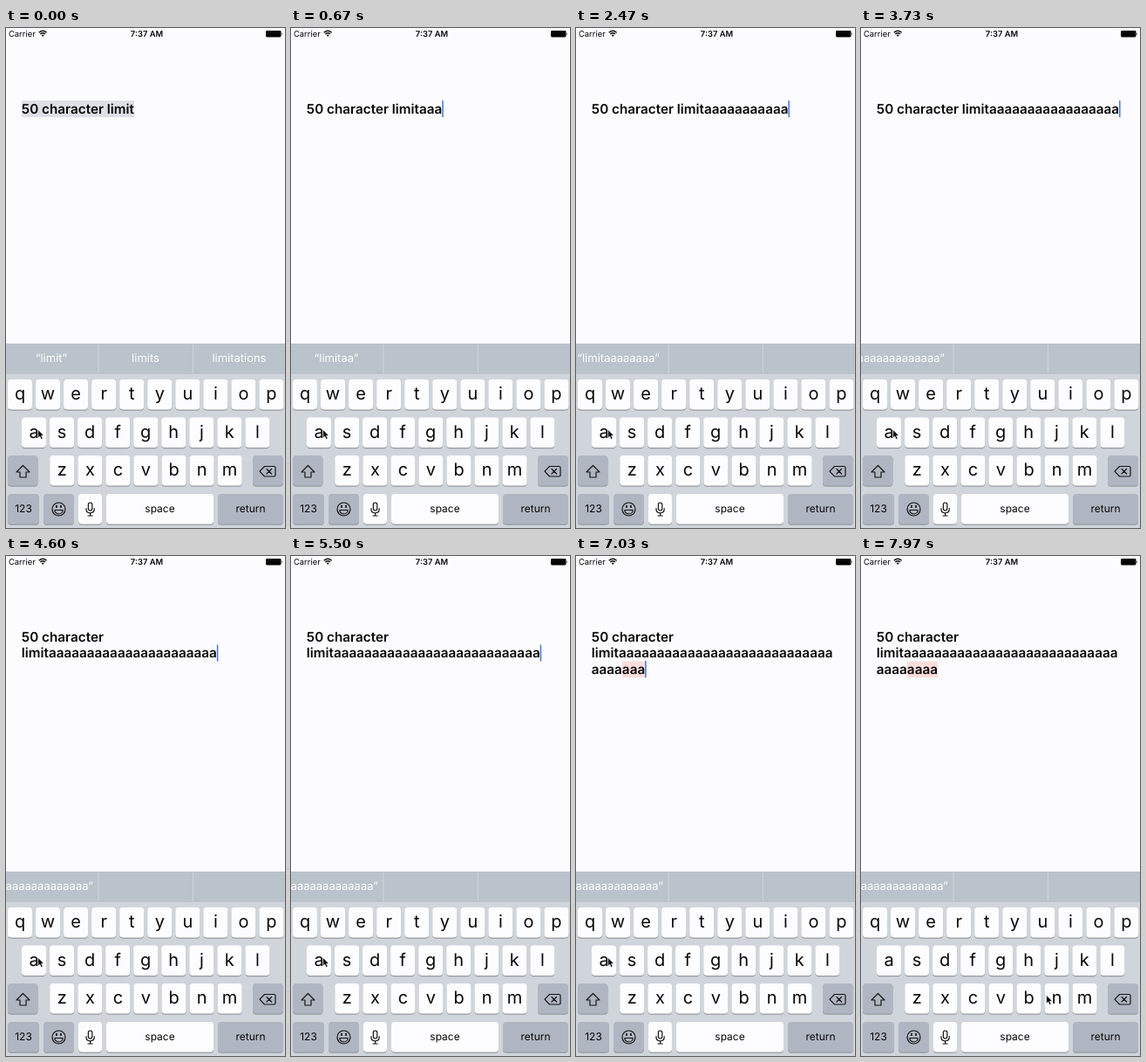
An HTML page for the animation above (8000 ms loop, 320 px wide and 572 px high).

```html
<!DOCTYPE html>
<html lang="en">
<head>
<meta charset="utf-8">
<title>Character limit</title>
<style>
  html, body { margin: 0; width: 100%; height: 100%; overflow: hidden; background: #fcfcfe; }
  svg { display: block; width: 100%; height: 100%; }
  text { font-family: Inter, "Noto Sans", sans-serif; fill: #080808; text-rendering: geometricPrecision; }
  .mid text, text.mid { text-anchor: middle; }
  .note text { font-weight: 600; }
  .status { font-size: 9.4px; }
  .hint text { font-size: 13px; fill: #fcfcfa; }
  .letter { font-size: 20px; }
  .label { font-size: 12px; }
  .icon { fill: none; stroke: #151515; stroke-width: 1.2; stroke-linejoin: round; stroke-linecap: round; }
</style>
</head>
<body>
<svg viewBox="0 0 320 572">
  <rect width="320" height="572" fill="#fcfcfe"/>

  <g class="status">
    <text x="3" y="10">Carrier</text>
    <g fill="none" stroke="#111" stroke-width="1.3">
      <path d="M37.7 5.2Q42.2 1.2 46.7 5.2M39.3 7Q42.2 4.5 45.1 7"/>
      <path d="M40.7 8.2L42.2 10L43.7 8.2Q42.2 7 40.7 8.2Z" fill="#111" stroke="none"/>
    </g>
    <text class="mid" x="161.5" y="10" font-weight="600">7:37 AM</text>
    <rect x="298" y="3" width="17.5" height="7.5" rx="1.4" fill="#050505"/>
    <path d="M316.2 5.2q1.4 1.5 0 3z" fill="#050505"/>
  </g>

  <rect id="intro" x="18" y="83" width="129" height="19" fill="#dfe0e6"/>
  <rect id="excess" y="120.5" height="18.5" fill="#fddcdc"/>
  <g class="note" id="note">
    <text x="17.8" y="98"></text><text x="17.8" y="116"></text><text x="17.8" y="135"></text>
  </g>
  <rect id="caret" width="1.5" height="19" fill="#4a74d4"/>

  <rect y="361" width="320" height="211" fill="#d0d5db"/>
  <rect y="361" width="320" height="35" fill="#bac3cb"/>
  <path d="M106 362V395" stroke="#d0d5d8"/>
  <path d="M214.5 362V395" stroke="#d0d2d4"/>
  <g class="hint">
    <text id="typed" y="382" text-anchor="end"></text>
    <g id="others" class="mid">
      <text x="160" y="382">limits</text><text x="267.5" y="382">limitations</text>
    </g>
  </g>

  <g id="keys" class="mid"></g>

  <g class="icon">
    <path d="M19.5 500.5L27 508H23V514H16V508H12Z"/>
    <path d="M296.5 501.5H307.5Q309 501.5 309 503V511.5Q309 513 307.5 513H296.5L291 507.2ZM299 504.5L304.5 510M304.5 504.5L299 510"/>
    <circle cx="60.5" cy="550.5" r="7.5"/>
    <path d="M55.8 551.5H65.2A4.7 4.5 0 0 1 55.8 551.5Z"/>
    <path d="M58 546.6V548.2M63 546.6V548.2" stroke-width="1.7"/>
    <rect x="94.4" y="543" width="4.4" height="9" rx="2.2"/>
    <path d="M92 549.5V550.5Q92 554.8 96.6 554.8T101.2 550.5V549.5M96.6 555V558M94 558H99.2"/>
  </g>

  <g id="popup">
    <path d="M14 397H51Q57 397 57 403V430C57 441 46 443 46 453V476Q46 480 42 480H22Q18 480 18 476V453C18 443 8 441 8 430V403Q8 397 14 397Z"
      fill="#fdfdff" stroke="#b4b9c0" stroke-width=".7"/>
    <text class="mid" x="32" y="430" font-size="29">a</text>
  </g>

  <path id="pointer" d="M0 0V9.4L2.1 7.4L3.7 11L5.3 10.3L3.8 6.8H6.6Z" fill="#050505" stroke="#fff" stroke-width=".5"/>
</svg>

<script>
const LOOP = 8000, LIMIT = 32, LEFT = 17.8, PITCH = 8.77;
const $ = id => document.getElementById(id);
const show = (el, on) => el.setAttribute("visibility", on ? "visible" : "hidden");
const attrs = (el, values) => {
  for (const name in values) el.setAttribute(name, values[name]);
  return el;
};
const add = (name, values, text = "") => {
  const el = attrs(document.createElementNS("http://www.w3.org/2000/svg", name), values);
  el.textContent = text;
  $("keys").append(el);
};

// Keyboard
function key(x, y, width, text = "", dark = false, kind = "label") {
  const box = { x, width, height: 34.5, rx: 4 };
  add("rect", { ...box, y: y + 1.2, fill: "#989ca2" });
  add("rect", { ...box, y, fill: dark ? "#b0b6c1" : "#fdfdff" });
  add("text", { x: x + width / 2, y: y + (kind === "letter" ? 23 : 21.3), class: kind }, text);
}
[["qwertyuiop", 2, 402], ["asdfghjkl", 18, 445.5], ["zxcvbnm", 50.3, 489]].forEach(([row, x, y]) =>
  [...row].forEach((char, i) => key(x + i * 32.05, y, 28, char, false, "letter")));
key(2, 489, 34.5, "", true);
key(283, 489, 35, "", true);
key(2, 533, 36, "123", true);
key(43, 533, 35, "", true);
key(83, 533, 27);
key(115, 533, 123, "space");
key(243, 533, 75, "return", true);

// Letter times: [letter count, ms], evenly spaced in between
const pace = [[1, 180], [8, 1510], [11, 2330], [17, 3650], [27, 5430], [36, 7160]];
const strokes = [180];
pace.slice(1).forEach(([n, t], i) => {
  const [n0, t0] = pace[i];
  for (let k = n0 + 1; k <= n; k++) strokes.push(t0 + (t - t0) * (k - n0) / (n - n0));
});
const countAt = t => strokes.filter(s => s <= t).length;
const letters = n => "a".repeat(Math.max(0, n));

// Pick the font size whose "a" advances by PITCH
const lines = [...$("note").children];
$("note").style.fontSize = "15px";
lines[0].textContent = letters(20);
$("note").style.fontSize = 15 * PITCH * 20 / lines[0].getComputedTextLength() + "px";

function drawNote(t, n) {
  const rows = n <= 17
    ? ["50 character limit" + letters(n)]
    : ["50 character", "limit" + letters(Math.min(n, 28)), letters(n - 28)].filter(Boolean);
  lines.forEach((line, i) => line.textContent = rows[i] || "");
  const last = rows.length - 1;
  attrs($("caret"), { x: LEFT + lines[last].getComputedTextLength(), y: 83 + last * 18.5 });
  show($("caret"), n > 0 && t < 7680);
  show($("intro"), n === 0);
  show($("excess"), n > LIMIT);
  attrs($("excess"), { x: LEFT + 4 * PITCH, width: Math.max(0, n - LIMIT) * PITCH });
}

function drawHints(t) {
  const n = Math.min(countAt(t - 200), t < 2500 ? 8 : 36);
  const typed = $("typed");
  typed.textContent = "“limit" + letters(n) + "”";
  const right = 52 + typed.getComputedTextLength() / 2;
  typed.setAttribute("x", Math.min(right, n > 20 ? 100 : 96));
  show($("others"), n === 0);
}

function drawPointer(t) {
  const p = Math.min(1, Math.max(0, (t - 7400) / 450));
  const ease = p * p * (3 - 2 * p);
  $("pointer").setAttribute("transform", `translate(${36.7 + 176 * ease} ${459.5 + 43 * ease})`);
}

const start = performance.now();
function frame() {
  const t = (performance.now() - start) % LOOP;
  drawNote(t, countAt(t));
  drawHints(t);
  drawPointer(t);
  show($("popup"), strokes.some(s => t >= s - 70 && t < s + 20));
  requestAnimationFrame(frame);
}
frame();
</script>
</body>
</html>
```
